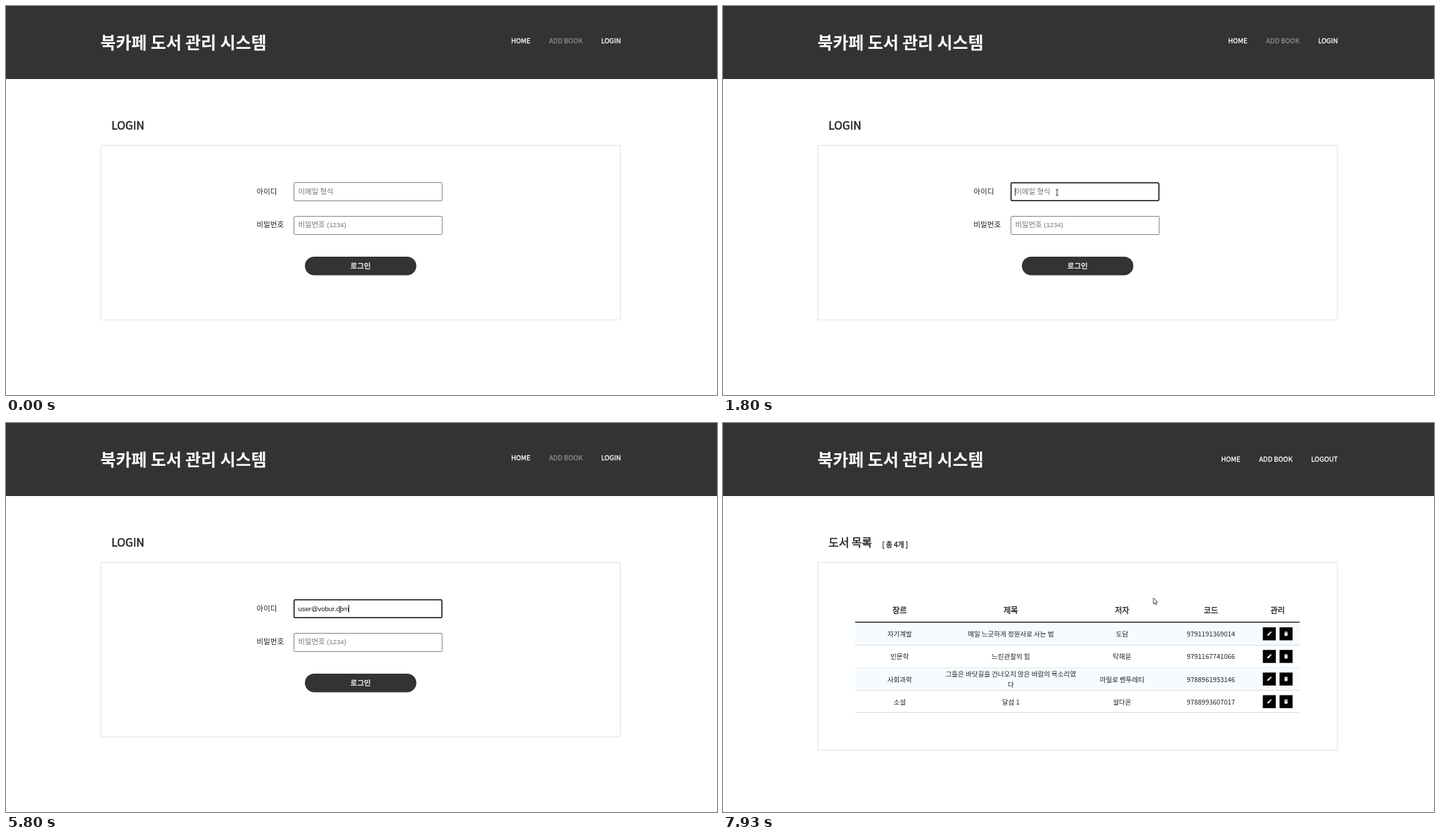
These frames come from a looping animation (1011x554 px, 8000 ms). An HTML page with a canvas:

```html
<!DOCTYPE html>
<html lang="ko">
<head>
<meta charset="utf-8">
<title>북카페 도서 관리 시스템</title>
<style>
html, body { margin: 0; width: 100%; height: 100%; overflow: hidden; background: #fff; }
canvas { display: block; width: 1011px; height: 554px; }
</style>
</head>
<body>
<canvas id="stage"></canvas>
<script>
const W = 1011, H = 554, LOOP = 8000;
const SANS = '"Noto Sans CJK KR", "Noto Sans KR", "Noto Sans CJK JP", "Noto Sans CJK", sans-serif';
const ARIAL = '"Liberation Sans", Arial, sans-serif';
const DARK = '#333', INK = '#222', HINT = '#757575';

const canvas = document.getElementById('stage');
const ratio = window.devicePixelRatio || 1;
canvas.width = Math.round(W * ratio);
canvas.height = Math.round(H * ratio);
const ctx = canvas.getContext('2d');
ctx.scale(ratio, ratio);

const EMAIL = 'user@vobur.com';
const KEY_TIMES = [2600, 2870, 3000, 3200, 3730, 4270, 4470, 4670, 4930, 5070, 5200, 5470, 5600, 5800];
const DOT_TIMES = [6270, 6400, 6670, 6800];
const FOCUS_ID = 1800, FOCUS_PASSWORD = 6000, SHOW_LIST = 7000;

const BOOKS = [
  ['자기계발', ['매일 느긋하게 정원사로 사는 법'], '도담', '9791191369014'],
  ['인문학', ['느린관찰의 힘'], '탁해윤', '9791167741066'],
  ['사회과학', ['그들은 바닷길을 건너오지 않은 바람의 목소리였', '다'], '마릴로 벤투레티', '9788961953146'],
  ['소설', ['달섬 1'], '설다온', '9788993607017']
];
const COLUMNS = [251.2, 409.3, 567.4, 693.8, 788.8];

// Pointer waypoints: time, x, y
const ARRIVE = [[1000, 615, 92], [1270, 500, 412], [1400, 477, 336], [1600, 475, 265.5]];
const LEAVE = [[7733, 476, 264.5], [7867, 560, 233], [7933, 612, 249]];

const textWidth = (s, font) => { ctx.font = font; return ctx.measureText(s).width; };
const noMedium = textWidth('LOGIN', `500 100px ${SANS}`) === textWidth('LOGIN', `400 100px ${SANS}`);

function text(s, x, y, size, { weight = 400, color = INK, align = 'left', family = SANS } = {}) {
  ctx.font = `${weight} ${size}px ${family}`;
  ctx.textAlign = align;
  ctx.fillStyle = color;
  ctx.fillText(s, x, y);
  if (weight === 500 && noMedium) {
    ctx.strokeStyle = color;
    ctx.lineWidth = size * 0.03;
    ctx.lineJoin = 'round';
    ctx.strokeText(s, x, y);
  }
}

function rect(x, y, w, h, color) {
  ctx.fillStyle = color;
  ctx.fillRect(x, y, w, h);
}

function roundPath(x, y, w, h, r) {
  ctx.beginPath();
  ctx.roundRect(x, y, w, h, r);
}

function outline(x, y, w, h, r, color, width) {
  roundPath(x, y, w, h, r);
  ctx.strokeStyle = color;
  ctx.lineWidth = width;
  ctx.stroke();
}

function polygon(points, fill) {
  ctx.beginPath();
  points.forEach(([x, y]) => ctx.lineTo(x, y));
  ctx.closePath();
  ctx.fillStyle = fill;
  ctx.fill();
}

function header(items, y, mutedItem) {
  rect(0, 0, W, 104, DARK);
  text('북카페 도서 관리 시스템', 134.3, 61, 23.9, { weight: 700, color: '#fff' });
  items.forEach(([label, right]) => text(label, right, y, 9.5,
    { weight: 500, color: label === mutedItem ? '#8c8c8c' : '#fff', align: 'right' }));
}

function panel(bottom) {
  outline(134.8, 198.5, 738.8, bottom - 198.5, 0, '#e2e2e2', 1);
}

function field(y, focused) {
  if (focused) outline(409.6, y + 0.7, 210.2, 25.6, 1.5, '#101010', 1.5);
  else outline(409.5, y + 0.5, 210.7, 26, 1, '#858585', 1);
}

function caret(x, y) {
  rect(Math.round(x), y, 1, 11, '#333');
}

function typedCount(times, t) {
  return times.filter(k => t >= k).length;
}

function loginPage(t) {
  header([['HOME', 745.6], ['ADD BOOK', 819.8], ['LOGIN', 874.3]], 52.5, 'ADD BOOK');
  text('LOGIN', 149.9, 176.3, 15.84, { weight: 500 });
  panel(447);
  text('아이디', 356.3, 267.6, 10.56);
  text('비밀번호', 356.3, 315.2, 10.56);

  const onPassword = t >= FOCUS_PASSWORD;
  const onId = t >= FOCUS_ID && !onPassword;
  field(251, onId);
  field(299, onPassword);

  const left = 415.4;
  const typed = EMAIL.slice(0, typedCount(KEY_TIMES, t));
  if (typed) text(typed, left, 268, 9.5, { color: '#111', family: ARIAL });
  else text('이메일 형식', left, 267.6, 10.4, { color: HINT });
  const blinkedOff = t >= 2270 && !typed;
  if (onId && !blinkedOff) caret(left - 0.4 + textWidth(typed, `9.5px ${ARIAL}`), 259);

  const dots = typedCount(DOT_TIMES, t);
  if (dots) {
    text('•'.repeat(dots), left, 315.4, 9.5, { color: '#111', family: ARIAL });
  } else {
    text('비밀번호', left, 315.2, 10.4, { color: HINT });
    text('(1234)', 456.3, 315.4, 9.5, { color: HINT, family: ARIAL });
  }
  if (onPassword) caret(left - 0.4 + textWidth('•'.repeat(dots), `9.5px ${ARIAL}`), 307);

  roundPath(425, 357, 158.5, 26.4, 13.2);
  ctx.fillStyle = DARK;
  ctx.fill();
  text('로그인', 504.2, 374.1, 10.4, { weight: 500, color: '#fff', align: 'center' });
}

function iconButton(x, y) {
  rect(x, y, 18.5, 18.5, '#000');
}

function pencil(x, y) {
  ctx.save();
  ctx.translate(x, y);
  ctx.rotate(-Math.PI / 4);
  polygon([[-4, 0], [-2.6, -1.1], [1.8, -1.1], [1.8, 1.1], [-2.6, 1.1]], '#fff');
  rect(2.3, -1.1, 1.5, 2.2, '#fff');
  ctx.restore();
}

function trash(x, y) {
  rect(x - 2.4, y - 2.5, 4.8, 0.9, '#fff');
  rect(x - 1, y - 3.1, 2, 0.8, '#fff');
  roundPath(x - 2.1, y - 1.2, 4.2, 4.3, 0.6);
  ctx.fillStyle = '#fff';
  ctx.fill();
}

function listPage() {
  header([['HOME', 735.6], ['ADD BOOK', 809.8], ['LOGOUT', 874.3]], 55.3);
  text('도서 목록', 150.1, 176.3, 15.84, { weight: 500 });
  text('[ 총 4개 ]', 226.2, 176.5, 9.9, { weight: 500 });
  panel(466);

  const left = 188, width = 632;
  ['장르', '제목', '저자', '코드', '관리'].forEach((label, i) =>
    text(label, COLUMNS[i], 271.2, 11.1, { weight: 500, align: 'center' }));

  BOOKS.forEach(([genre, title, author, code], row) => {
    const top = 284.2 + row * 32.2, base = top + 20;
    if (row % 2 === 0) rect(left, top, width, 32, '#f5fbff');
    rect(left, Math.round(top + 31.6), width, 1, '#dcdcdc');
    const cell = (s, col, y = base) => text(s, COLUMNS[col], y, 9.5, { align: 'center' });
    cell(genre, 0);
    title.forEach((line, i) => cell(line, 1, base + (i - (title.length - 1) / 2) * 15.4));
    cell(author, 2);
    cell(code, 3);
    const y = top + 6.8;
    iconButton(767.6, y);
    iconButton(791.4, y);
    pencil(776.8, y + 9.1);
    trash(800.6, y + 9.1);
  });
  rect(left, 283, width, 1.2, '#000');
}

function along(path, t) {
  const next = path.findIndex(p => p[0] > t);
  if (next < 0) return path[path.length - 1].slice(1);
  const [t0, x0, y0] = path[Math.max(0, next - 1)];
  const [t1, x1, y1] = path[next];
  const k = t1 > t0 ? Math.max(0, (t - t0) / (t1 - t0)) : 0;
  return [x0 + (x1 - x0) * k, y0 + (y1 - y0) * k];
}

function arrow(x, y) {
  const shape = [[0, 0], [0, 8.6], [1.9, 6.9], [3.2, 9.8], [4.6, 9.2], [3.4, 6.3], [6, 6.2]];
  polygon(shape.map(([dx, dy]) => [x + dx, y + dy]), '#fff');
  ctx.strokeStyle = '#222';
  ctx.lineWidth = 0.8;
  ctx.lineJoin = 'miter';
  ctx.stroke();
}

function textCursor(x, y) {
  rect(x - 0.5, y - 4, 1, 8, '#333');
  rect(x - 2, y - 4.5, 4, 0.9, '#444');
  rect(x - 2, y + 3.6, 4, 0.9, '#444');
}

function pointer(t) {
  const tick = Math.floor((t + 4) * 0.015) / 0.015 + 0.5;
  if (tick < 1000) return;
  const leaving = tick >= 7733;
  const [x, y] = along(leaving ? LEAVE : ARRIVE, tick);
  const overField = x > 409 && x < 620 && ((y > 251 && y < 278) || (y > 299 && y < 325));
  (overField && !leaving ? textCursor : arrow)(x, y);
}

function draw(now) {
  const t = now % LOOP;
  rect(0, 0, W, H, '#fff');
  if (t < SHOW_LIST) loginPage(t);
  else listPage();
  pointer(t);
}

const start = performance.now();
function frame() {
  draw(performance.now() - start);
  requestAnimationFrame(frame);
}
frame();
</script>
</body>
</html>
```
